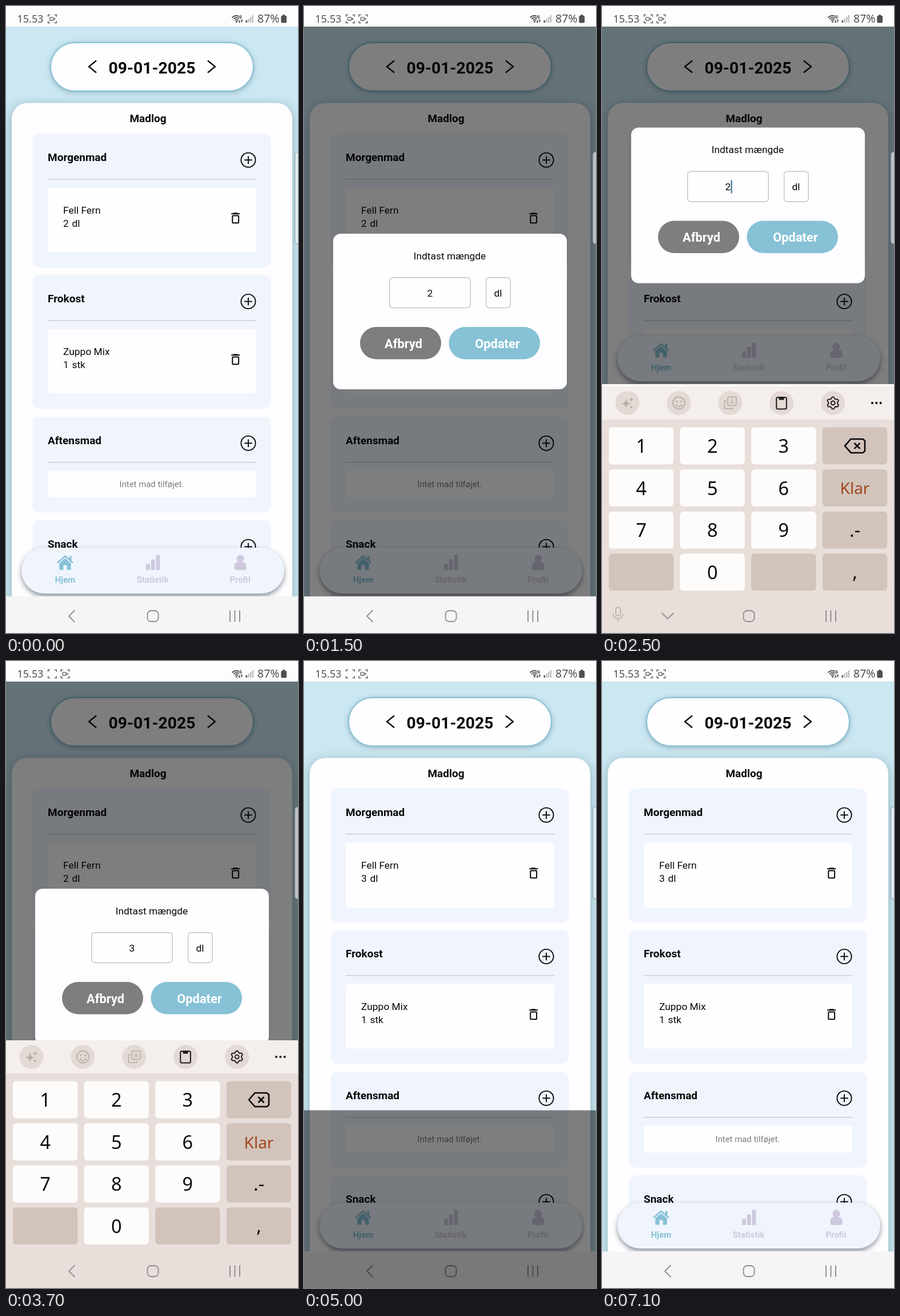
Write an HTML page with a canvas that moves like this. It is 511 by 1096 pixels and loops after 7200 ms.

```html
<!DOCTYPE html>
<html lang="da">
<head>
<meta charset="utf-8">
<title>Madlog</title>
<style>
html, body { margin: 0; width: 100%; height: 100%; overflow: hidden; background: #fff; }
canvas { display: block; width: 511px; height: 1096px; }
</style>
</head>
<body>
<canvas id="stage"></canvas>
<script>
const W = 511, H = 1096, LOOP = 7200, STEP = 100;
const TOP = 36, NAV = 1032, KEYS_TOP = 663, KEYS_H = H - KEYS_TOP, SMALL = 661;
const INK = '#08080a', WHITE = '#fefdff', CARD = '#f0f5fd', BLUE = '#86c1d6', LILAC = '#cec9de';
const ROBOTO = 'Roboto, Arial, sans-serif', NOTO = '"Noto Sans", Roboto, sans-serif';

const canvas = document.getElementById('stage');
const c = canvas.getContext('2d');
const dpr = window.devicePixelRatio || 1;
canvas.width = W * dpr;
canvas.height = H * dpr;

// drawing helpers
function rr(x, y, w, h, r, fill, stroke, lw = 1.4) {
  c.beginPath();
  c.roundRect(x, y, w, h, r);
  if (fill) { c.fillStyle = fill; c.fill(); }
  if (stroke) { c.strokeStyle = stroke; c.lineWidth = lw; c.stroke(); }
}
function shadowed(color, blur, dy, draw) {
  c.save();
  c.shadowColor = color;
  c.shadowBlur = blur * dpr;
  c.shadowOffsetY = dy * dpr;
  draw();
  c.restore();
}
function line(color, lw, ...pts) {
  c.beginPath();
  for (let i = 0; i < pts.length; i += 2) c.lineTo(pts[i], pts[i + 1]);
  c.strokeStyle = color;
  c.lineWidth = lw;
  c.stroke();
}
function poly(color, ...pts) {
  c.beginPath();
  for (let i = 0; i < pts.length; i += 2) c.lineTo(pts[i], pts[i + 1]);
  c.fillStyle = color;
  c.fill();
}
function disc(x, y, r, fill, stroke, lw = 2) {
  c.beginPath();
  c.arc(x, y, r, 0, Math.PI * 2);
  if (fill) { c.fillStyle = fill; c.fill(); }
  if (stroke) { c.strokeStyle = stroke; c.lineWidth = lw; c.stroke(); }
}
function text(str, x, y, size, o = {}) {
  c.font = `${o.weight || 400} ${size}px ${o.font || ROBOTO}`;
  c.textAlign = o.align || 'left';
  c.fillStyle = o.color || INK;
  c.fillText(str, x, y);
}
const center = (str, x, y, size, o) => text(str, x, y, size, { align: 'center', ...o });
function at(x, y, draw) {
  c.save();
  c.translate(x, y);
  draw();
  c.restore();
}

// timing
const clamp = p => Math.max(0, Math.min(1, p));
const smooth = p => 0.5 - 0.5 * Math.cos(Math.PI * clamp(p));
const within = (t, a, b) => t >= a && t < b;

const BLINK_OFF = [[700, 1200], [1700, 2200], [2700, 3200], [3700, 4200],
  [4700, 5100], [5700, 6100], [6600, 7100]];

function modalShift(t) {
  const full = H - TOP;
  return t < 4500 ? full * (1 - smooth((t - 1060) / 400)) : full * smooth((t - 4822) / 280);
}
function keysShift(t) {
  if (t < 3000) return KEYS_H * Math.pow(1 - clamp((t - 2250) / 300), 3.02);
  return KEYS_H * smooth((t - 3700) / 290);
}

// status bar
function recordIcon(x, lens) {
  const col = '#5c5c5f';
  at(x, 22.5, () => {
    for (const sx of [-1, 1]) for (const sy of [-1, 1])
      line(col, 1.5, sx * 3.8, sy * 7, sx * 7.3, sy * 7, sx * 7.3, sy * 3.8);
    if (!lens) return;
    rr(-4.3, -2.6, 6, 5.4, 1.2, null, col, 1.4);
    poly(col, 2.2, 0, 5, -2.3, 5, 2.6);
  });
}
function statusBar(t) {
  const col = '#505053';
  c.fillStyle = '#fefdfe';
  c.fillRect(0, 0, W, TOP);
  text('15.53', 19.5, 29, 18, { font: NOTO, color: col });
  recordIcon(81, !BLINK_OFF.some(([a, b]) => within(t, a, b)));
  c.globalAlpha = clamp((t - 100) / 300);
  recordIcon(103.5, true);
  c.globalAlpha = 1;

  for (const r of [4, 7.5, 11]) {
    c.beginPath();
    c.arc(403.5, 28, r, -Math.PI * 0.76, -Math.PI * 0.24);
    c.strokeStyle = col;
    c.lineWidth = 1.9;
    c.stroke();
  }
  disc(403.5, 27.5, 1.6, col);
  rr(407.5, 15, 7, 15, 0, '#fefdfe');
  center('6', 410.5, 22, 9, { font: NOTO, weight: 700, color: col });
  line(col, 1.2, 408.5, 24, 408.5, 29);
  line(col, 1.2, 412.5, 24, 412.5, 29);
  poly(col, 406.5, 27, 410.5, 27, 408.5, 30);
  poly(col, 410.5, 26, 414.5, 26, 412.5, 23);

  for (let i = 0; i < 4; i++) {
    const h = 4 + i * 3;
    rr(419.5 + i * 3.7, 29 - h, 2.5, h, 0.5, i < 1 ? col : '#bdbdc0');
  }
  text('87%', 440, 29, 19.5, { font: NOTO, color: col });
  rr(481.3, 17, 9.8, 12.5, 2, col);
  rr(484, 15.3, 4.4, 3, 0.8, col);
}

// app page
function plus(x, y) {
  disc(x, y, 12.6, null, INK, 1.9);
  line(INK, 1.9, x - 6.8, y, x + 6.8, y);
  line(INK, 1.9, x, y - 6.8, x, y + 6.8);
}
function trash(x, y) {
  at(x, y, () => {
    rr(-7.5, -8.6, 15, 2, 0, INK);
    rr(-3.6, -9.6, 7.2, 2, 0, INK);
    rr(-5.4, -4.2, 10.8, 12.6, 1, null, INK, 2);
  });
}
function meal(y, h, title) {
  rr(46.5, y, 417, h, 12, CARD);
  text(title, 73, y + 47.5, 19, { weight: 700 });
  plus(424, y + 46.2);
  line('#c3c7cc', 1.4, 73, y + 79.6, 438, y + 79.6);
}
function food(y, name, amount, unit) {
  rr(73, y, 365, 113, 5, WHITE);
  text(name, 100, y + 45, 17.4);
  text(amount, 100, y + 68.6, 17.4);
  text(unit, 115.4, y + 68.6, 17.4);
  trash(401.7, y + 53);
}
function tabBar(y) {
  shadowed('rgba(40,45,60,.5)', 9, 4, () => rr(27, y, 460, 80, 40, CARD));
  at(0, y, () => {
    line(BLUE, 2.7, 90, 26.5, 103.5, 14.8, 117, 26.5);
    rr(110.7, 14.5, 3.7, 8, 0, BLUE);
    poly(BLUE, 103.5, 18.6, 113.6, 27.3, 113.6, 38.5, 106.6, 38.5, 106.6, 30.5,
      100.4, 30.5, 100.4, 38.5, 93.4, 38.5, 93.4, 27.3);
    for (let i = 0; i < 3; i++) rr(245 + i * 8.8, 28 - i * 7.7, 6.8, 11 + i * 7.7, 1.3, LILAC);
    disc(410, 19.2, 6.6, LILAC);
    rr(399.3, 25, 21.4, 14, [6.5, 6.5, 4, 4], LILAC);
    ['Hjem', 'Statistik', 'Profil'].forEach((s, i) =>
      center(s, 103.5 + i * 153, 61.2, 14.9, { weight: 700, color: i ? LILAC : BLUE }));
  });
}
function page(bottom, amount) {
  c.save();
  c.beginPath();
  c.rect(0, TOP, W, bottom - TOP);
  c.clip();
  c.fillStyle = '#cae7f2';
  c.fillRect(0, TOP, W, H);

  shadowed('rgba(60,90,105,.45)', 10, 2, () => rr(78, 64, 355, 84.5, 42.2, WHITE));
  rr(78, 64, 355, 84.5, 42.2, null, BLUE, 2);
  center('09-01-2025', 255.5, 117.6, 28.3, { weight: 700 });
  line(INK, 2.3, 158, 95.5, 145, 106, 158, 116.5);
  line(INK, 2.3, 353, 95.5, 366, 106, 353, 116.5);

  shadowed('rgba(60,90,105,.42)', 18, 4, () => rr(10, 169.5, 491, 1000, 27, WHITE));
  center('Madlog', 248.5, 203, 19, { weight: 700 });
  meal(223, 234, 'Morgenmad');
  food(317.8, 'Fell Fern', amount, 'dl');
  meal(470.3, 233.8, 'Frokost');
  food(564.8, 'Zuppo Mix', '1', 'stk');
  meal(718, 167.5, 'Aftensmad');
  rr(73, 812, 365, 47.5, 5, WHITE);
  center('Intet mad tilføjet.', 255, 841.3, 14.9, { color: '#7b7b7e' });
  meal(899, 234, 'Snack');
  tabBar(bottom - 85);
  c.restore();
}

// dialog with its dimmed backdrop
function modal(dy, bottom, value, caret) {
  c.save();
  c.translate(0, dy);
  c.beginPath();
  c.rect(0, TOP, W, bottom - TOP);
  c.clip();
  c.fillStyle = 'rgba(0,0,0,.5)';
  c.fillRect(0, TOP, W, bottom - TOP);
  c.translate(0, (bottom - NAV) / 2);
  rr(51, 398, 409, 272, 13, WHITE);
  center('Indtast mængde', 255, 442.6, 17.4);
  rr(149.7, 474.7, 141.6, 52.8, 5.5, null, '#c4c3c8');
  rr(318.7, 474.7, 42.6, 52.8, 5.5, null, '#c4c3c8');
  center(value, 220.5, 507.7, 17.4);
  if (caret) {
    c.fillStyle = '#4e8199';
    c.fillRect(220.5 + c.measureText(value).width / 2, 490, 2.4, 23);
  }
  center('dl', 339.5, 507.7, 17.4);
  rr(98, 561, 142, 56.5, 28.2, '#807d80');
  rr(253.5, 561, 159.5, 56.5, 28.2, BLUE);
  center('Afbryd', 174, 597.8, 21.8, { weight: 700, color: '#fff' });
  center('Opdater', 338.5, 597.8, 21.8, { weight: 700, color: '#fff' });
  c.restore();
}

// system navigation
function navIcons(down) {
  const col = '#8f8c91';
  if (down) line(col, 1.8, 104.5, 1061, 115, 1071, 125.5, 1061);
  else line(col, 1.8, 120.5, 1056, 110, 1066.5, 120.5, 1077);
  rr(247.6, 1057, 19, 19, 6.2, null, col, 1.8);
  for (const x of [392, 400.5, 409]) line(col, 1.9, x, 1056.5, x, 1076.5);
}
function mic() {
  const col = '#b8aeaa';
  rr(24.2, 1051, 8, 15, 4, null, col, 1.7);
  c.beginPath();
  c.arc(28.2, 1062.5, 8.6, 0, Math.PI);
  c.stroke();
  line(col, 1.7, 28.2, 1071, 28.2, 1076);
}

// keyboard
function spark(x, y, r) {
  c.beginPath();
  c.moveTo(x, y - r);
  c.quadraticCurveTo(x, y, x + r, y);
  c.quadraticCurveTo(x, y, x, y + r);
  c.quadraticCurveTo(x, y, x - r, y);
  c.quadraticCurveTo(x, y, x, y - r);
  c.fill();
}
function toolIcons() {
  const pale = '#b9aeaa', dark = '#1d1b1b';
  for (let i = 0; i < 5; i++) disc(44.5 + i * 89.9, 692, 21, '#e3d9d5');
  c.fillStyle = pale;
  spark(42, 693, 10);
  spark(51, 686, 5);
  spark(51, 699, 4);

  disc(134.5, 692, 10.5, null, pale, 1.8);
  disc(130.7, 689.3, 1.5, pale);
  disc(138.3, 689.3, 1.5, pale);
  c.beginPath();
  c.arc(134.5, 693, 5.3, 0.25, Math.PI - 0.25);
  c.stroke();

  rr(220, 681.5, 15, 15, 2.5, null, pale, 1.7);
  center('A', 227.5, 693.6, 12, { font: NOTO, color: pale });
  line(pale, 1.7, 217, 688, 214.5, 688, 214.5, 702, 229, 702, 229, 699.5);

  rr(305.3, 682, 17.6, 20.5, 2.5, null, dark, 2);
  rr(309.6, 681, 9, 5.6, 1, dark);

  at(404.2, 692, () => {
    c.beginPath();
    for (let i = 0; i < 48; i++) {
      const a = i / 48 * Math.PI * 2, r = 9.2 + 1.3 * Math.tanh(3 * Math.cos(6 * a));
      c.lineTo(r * Math.sin(a), r * Math.cos(a));
    }
    c.closePath();
    c.lineWidth = 1.9;
    c.stroke();
    disc(0, 0, 3.4, null, dark, 1.9);
  });
  for (let i = -1; i < 2; i++) disc(480.3 + i * 7.3, 692, 2.1, dark);
}
function keyboard(dy) {
  at(0, dy, () => {
    c.fillStyle = '#e8dfdb';
    c.fillRect(0, KEYS_TOP, W, KEYS_H);
    c.fillStyle = '#f4efed';
    c.fillRect(0, KEYS_TOP, W, 58);
    toolIcons();
    const rows = ['123<', '456K', '789-', ' 0 ,'];
    rows.forEach((row, j) => [...row].forEach((k, i) => {
      const x = 12 + i * 124.6, y = 734.5 + j * 73.6, mx = x + 56.7;
      rr(x, y, 113.3, 64.8, 6, k >= '0' && k <= '9' ? '#fefcfb' : '#d2c4bb');
      if (k >= '0' && k <= '9') center(k, mx, y + 44.5, 32.5, { font: NOTO });
      if (k === 'K') center('Klar', mx, y + 43.4, 28, { font: NOTO, color: '#a0471d' });
      if (k === '-') center('.-', mx, y + 44, 32, { font: NOTO });
      if (k === ',') center(',', mx, y + 44, 32, { font: NOTO });
      if (k === '<') at(mx, y + 32.5, () => {
        c.lineJoin = 'round';
        line(INK, 2.6, -7, -12, 14, -12, 17.5, -9, 17.5, 9, 14, 12, -7, 12, -17.5, 0, -7, -12, 0, -12);
        line(INK, 2.6, -1, -5, 9, 5);
        line(INK, 2.6, 9, -5, -1, 5);
        c.lineJoin = 'miter';
      });
    }));
  });
}

function edgeHandle() {
  rr(505.6, 255, 12, 161, 5, 'rgba(250,251,253,.6)', 'rgba(125,145,155,.75)', 1.2);
}

function render(t) {
  const small = within(t, 2300, 3700);
  const bottom = small ? SMALL : NAV;
  const keys = within(t, 2300, 4000);
  const value = t < 2800 ? '2' : t < 3200 ? '' : '3';

  c.setTransform(dpr, 0, 0, dpr, 0, 0);
  c.fillStyle = '#fefdfe';
  c.fillRect(0, 0, W, H);
  page(bottom, t < 4600 ? '2' : '3');
  c.fillStyle = '#f6f4f6';
  c.fillRect(0, NAV, W, H - NAV);
  navIcons(false);
  if (within(t, 1100, 5100)) modal(modalShift(t), bottom, value, within(t, 2200, 3700));
  if (keys) {
    keyboard(keysShift(t));
    navIcons(small);
    if (small) mic();
  }
  statusBar(t);
  edgeHandle();
}

const start = performance.now();
function tick() {
  const t = (performance.now() - start) % LOOP;
  render(Math.floor(t / STEP) * STEP);
  requestAnimationFrame(tick);
}
tick();
</script>
</body>
</html>
```
